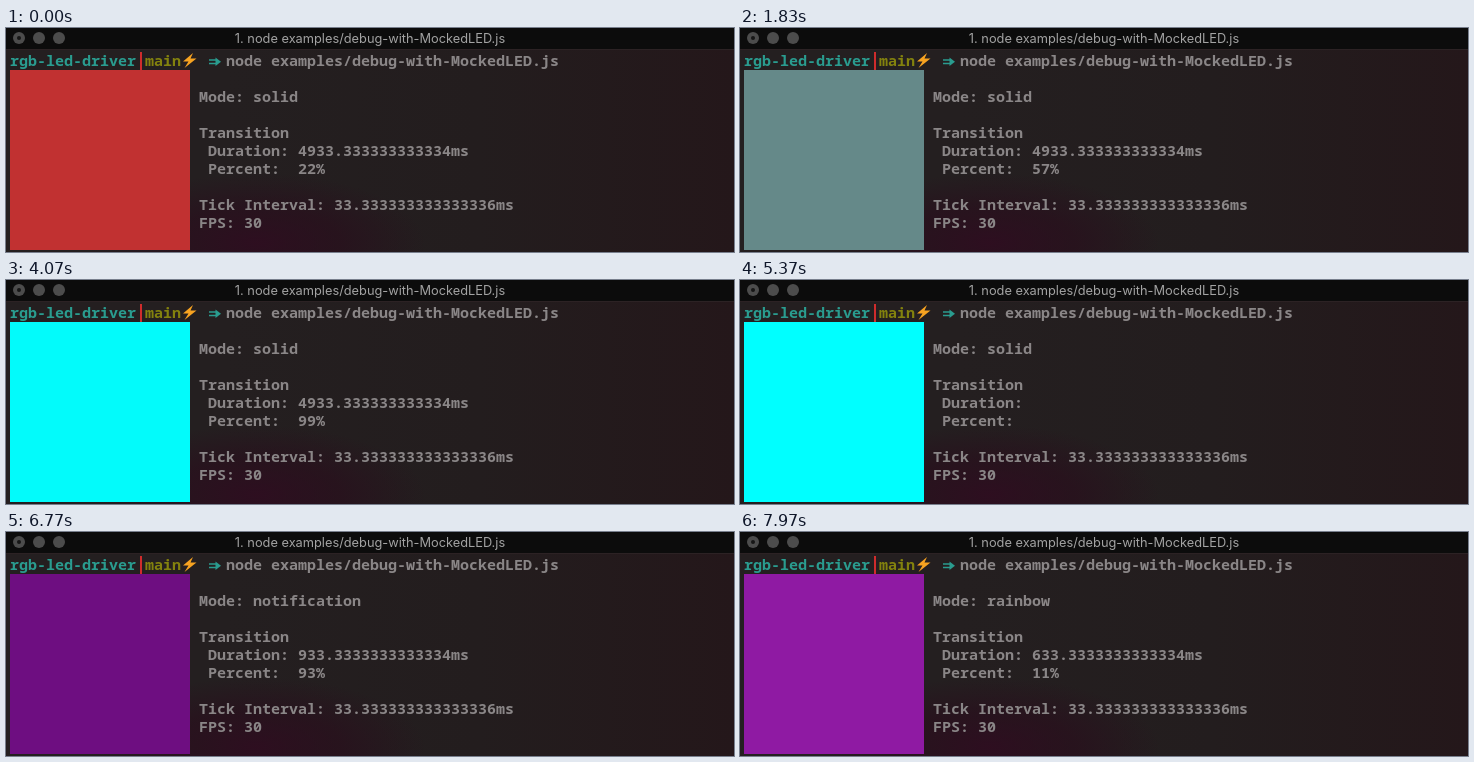
These frames come from a looping animation (728 by 224 pixels, 8000 ms). An HTML page:

```html
<!DOCTYPE html>
<html lang="en">
<head>
<meta charset="utf-8">
<title>LED driver debug</title>
<style>
  html, body { margin: 0; width: 100%; height: 100%; overflow: hidden; background: #231e20; }
  svg { display: block; width: 728px; height: 224px; }
  .term { font: 600 15px "Noto Sans Mono", "DejaVu Sans Mono", monospace; fill: #8a8687; }
  .title { font: 400 12.8px Inter, Roboto, sans-serif; fill: #a3a3a3; text-anchor: middle; }
</style>
</head>
<body>
<svg viewBox="0 0 728 224">
  <defs>
    <linearGradient id="wall">
      <stop offset=".3" stop-color="#241f20"/><stop offset=".65" stop-color="#231d1e"/><stop offset="1" stop-color="#24171a"/>
    </linearGradient>
    <radialGradient id="glow">
      <stop stop-color="#300a20" stop-opacity=".8"/><stop offset=".5" stop-color="#2a0c1c" stop-opacity=".6"/>
      <stop offset="1" stop-color="#2a0c1c" stop-opacity="0"/>
    </radialGradient>
  </defs>

  <rect width="728" height="224" fill="url(#wall)"/>
  <ellipse cx="250" cy="215" rx="170" ry="70" fill="url(#glow)"/>

  <rect width="728" height="21" fill="#0c0c0c"/>
  <rect y="21" width="728" height="1" fill="#2c2224"/>
  <g fill="#4c4c4c">
    <circle cx="13" cy="10" r="6"/><circle cx="33" cy="10" r="6"/><circle cx="53" cy="10" r="6"/>
  </g>
  <circle cx="13" cy="10" r="2" fill="#161616"/>
  <text class="title" x="364" y="14.5">1. node examples/debug-with-MockedLED.js</text>

  <g class="term">
    <text x="4" y="38" fill="#2a9c8f">rgb-led-driver</text>
    <rect x="134" y="24" width="2" height="18" fill="#d02c2c"/>
    <text x="139" y="38" fill="#83820e">main</text>
    <path d="M187 25 177 33.500h5.500l-4 6.500 12-9.500h-6z" fill="#f7a321"/>
    <path d="M203 32h8M203 35.500h8" stroke="#2a9c8f" stroke-width="1.400"/>
    <path d="M209.500 29.500 215 33.750l-5.500 4.250z" fill="#2a9c8f"/>
    <text x="220" y="38">node examples/debug-with-MockedLED.js</text>
    <text id="mode" x="193" y="74"></text>
    <text x="193" y="110">Transition</text>
    <text x="202" y="128">Duration:</text>
    <text id="duration" x="292" y="128"></text>
    <text x="202" y="146">Percent:</text>
    <text id="percent" x="292" y="146"></text>
    <text x="193" y="182">Tick Interval: 33.333333333333336ms</text>
    <text x="193" y="200">FPS: 30</text>
  </g>

  <rect id="led" x="4" y="42" width="180" height="180"/>
</svg>
<script>
const LOOP = 8000, TICK = 35.9;
const RED = [255, 0, 0], CYAN = [0, 255, 255], PURPLE = [128, 0, 128], BRIGHT = [168, 6, 160];

// ticks: transition length; done: ticks already elapsed when the phase begins
const phases = [
  { start: 0, mode: "solid", ticks: 148, done: 33.2, duration: "4933.333333333334", from: RED, to: CYAN },
  { start: 5832, mode: "notification", ticks: 28, done: 0, duration: "933.3333333333334", from: CYAN, to: PURPLE, after: pulse },
  { start: 7880, mode: "rainbow", ticks: 19, done: 0, duration: "633.3333333333334", from: BRIGHT, to: CYAN },
];

const byId = id => document.getElementById(id);
const mix = (a, b, k) => a.map((v, i) => v + (b[i] - v) * k);

function pulse(ms) {
  const level = 255 * (0.5 - 0.375 * Math.sin(2 * Math.PI * ms / 1900));
  return [level, 14, level];
}

// Slight darkening of the midtones, as the terminal shows them
const css = color => `rgb(${color.map(v => Math.round(255 * (v / 255) ** 1.1))})`;

function render(t) {
  const phase = phases.findLast(p => t >= p.start);
  const elapsed = Math.floor(phase.done + (t - phase.start) / TICK);
  const progress = Math.min(elapsed / phase.ticks, 1);
  const active = progress < 1;

  let color = mix(phase.from, phase.to, progress);
  if (!active && phase.after) color = phase.after((elapsed - phase.ticks) * TICK);

  byId("led").setAttribute("fill", css(color));
  byId("mode").textContent = "Mode: " + phase.mode;
  byId("duration").textContent = active ? phase.duration + "ms" : "";
  byId("percent").textContent = active ? Math.round(progress * 100) + "%" : "";
}

const begin = performance.now();
function loop() {
  render((performance.now() - begin) % LOOP);
  requestAnimationFrame(loop);
}
loop();
</script>
</body>
</html>
```
